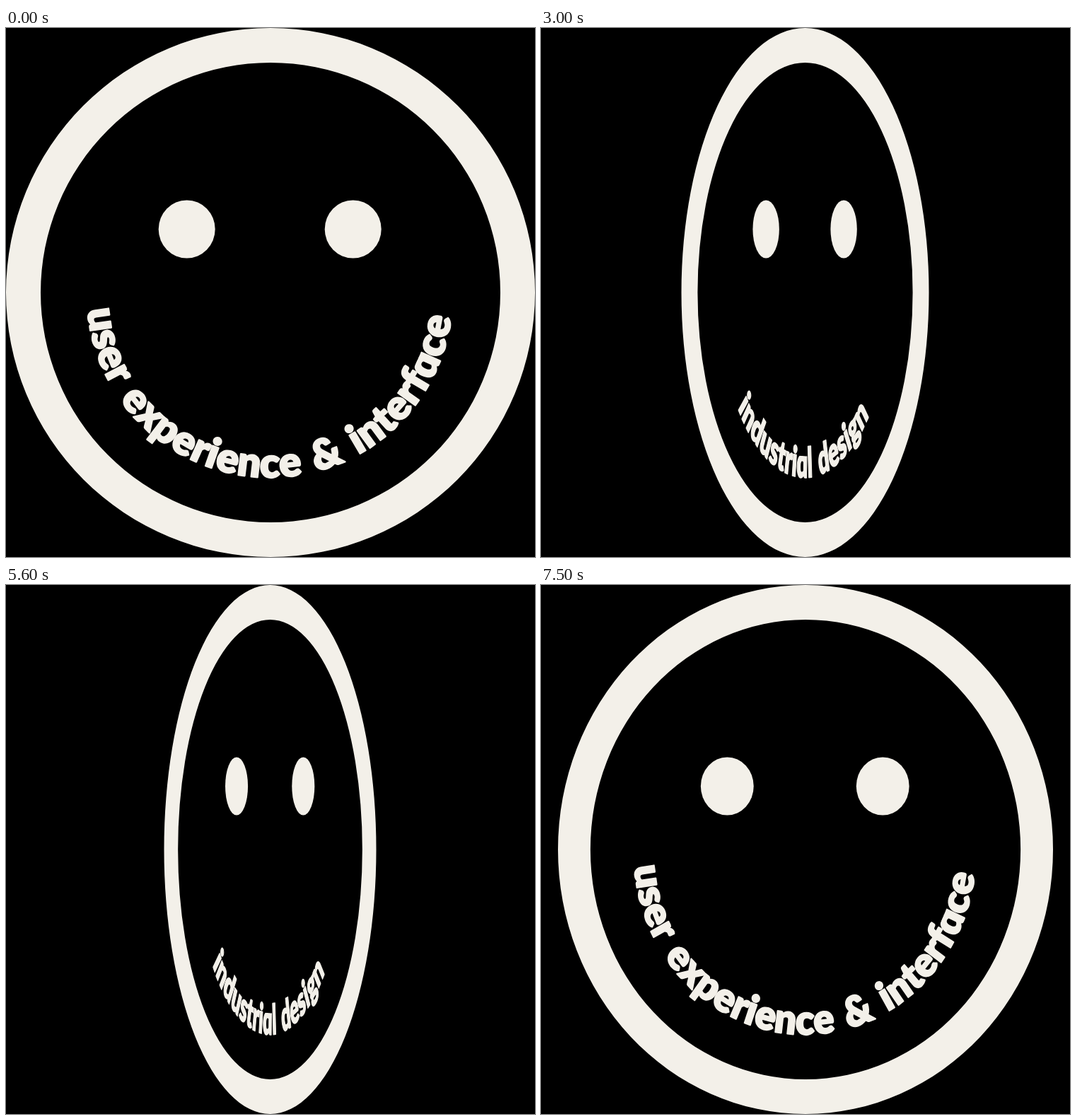
Write an HTML page with a canvas that moves like this. It is 748 by 748 pixels and loops after 7.6 s.

```html
<!DOCTYPE html>
<html lang="en">
<head>
<meta charset="utf-8">
<title>Spinning smile</title>
<style>
  html, body { margin: 0; width: 100%; height: 100%; overflow: hidden; background: #000; }
  canvas { display: block; width: 748px; height: 748px; }
</style>
</head>
<body>
<canvas id="stage" width="748" height="748"></canvas>
<script>
const ctx = document.getElementById('stage').getContext('2d');
const SIZE = 748, MID = SIZE / 2, TAU = Math.PI * 2;
const INK = '#f3f0e9';
const STEP = 100, HOLD = 1000, HALF = 3800;
const SQUEEZE = 14; // steps from wide to narrow, and back again
const SMILE = { x: 373, y: 377, r: 258.5 };
const FONT_SIZE = 58, X_HEIGHT = FONT_SIZE * 0.52;
const LABELS = [
  { text: 'user experience & interface', tilt: -1.2 },
  { text: 'industrial design', tilt: -1.4 }
];

// Width, centre and label of the face at a given time
function poseAt(ms) {
  const t = ms % (2 * HALF);
  const side = Math.floor(t / HALF);
  const n = Math.floor((t % HALF - HOLD) / STEP);
  if (n < 0) return { width: SIZE, cx: MID, label: LABELS[side] };
  const closing = n < SQUEEZE;
  const width = closing ? 700 - 50 * n : 50 * (n - SQUEEZE + 1);
  const cx = closing && width > 350 ? 374.6 : width < 400 ? 373.5 : MID;
  return { width, cx, label: LABELS[closing ? side : 1 - side] };
}

function drawRing() {
  ctx.beginPath();
  ctx.arc(MID, MID, 374, 0, TAU);
  ctx.arc(MID, MID, 325, 0, TAU, true);
  ctx.fill();
}

function drawEye(x) {
  ctx.beginPath();
  ctx.ellipse(x, 284.5, 40, 41, 0, 0, TAU);
  ctx.fill();
}

// Letters stand on the lower arc, reading left to right.
// A "d" cut off at x-height gives the single-storey "a".
function drawSmile({ text, tilt }) {
  const glyphs = text.replace(/a/g, 'd');
  const widthOf = s => ctx.measureText(s).width;
  const total = widthOf(glyphs);
  for (let i = 0; i < text.length; i++) {
    const along = widthOf(glyphs.slice(0, i)) + widthOf(glyphs[i]) / 2 - total / 2;
    ctx.save();
    ctx.translate(SMILE.x, SMILE.y);
    ctx.rotate(-along / SMILE.r - tilt * Math.PI / 180);
    ctx.translate(0, SMILE.r);
    if (text[i] === 'a') {
      ctx.beginPath();
      ctx.rect(-FONT_SIZE, -X_HEIGHT, 2 * FONT_SIZE, 2 * X_HEIGHT);
      ctx.clip();
    }
    ctx.fillText(glyphs[i], 0, 0);
    ctx.strokeText(glyphs[i], 0, 0);
    ctx.restore();
  }
}

function draw(ms) {
  const { width, cx, label } = poseAt(ms);
  ctx.setTransform(1, 0, 0, 1, 0, 0);
  ctx.fillStyle = '#000';
  ctx.fillRect(0, 0, SIZE, SIZE);
  ctx.translate(cx, 0);
  ctx.scale(width / SIZE, 1);
  ctx.translate(-MID, 0);
  ctx.fillStyle = ctx.strokeStyle = INK;
  ctx.lineWidth = 2.4;
  ctx.lineJoin = 'round';
  ctx.font = `900 ${FONT_SIZE}px Lato, sans-serif`;
  ctx.letterSpacing = '0.8px';
  ctx.wordSpacing = '6px';
  ctx.textAlign = 'center';
  drawRing();
  drawEye(255.7);
  drawEye(490.7);
  drawSmile(label);
}

const start = performance.now();
function tick() {
  draw(performance.now() - start);
  requestAnimationFrame(tick);
}
tick();
</script>
</body>
</html>
```
